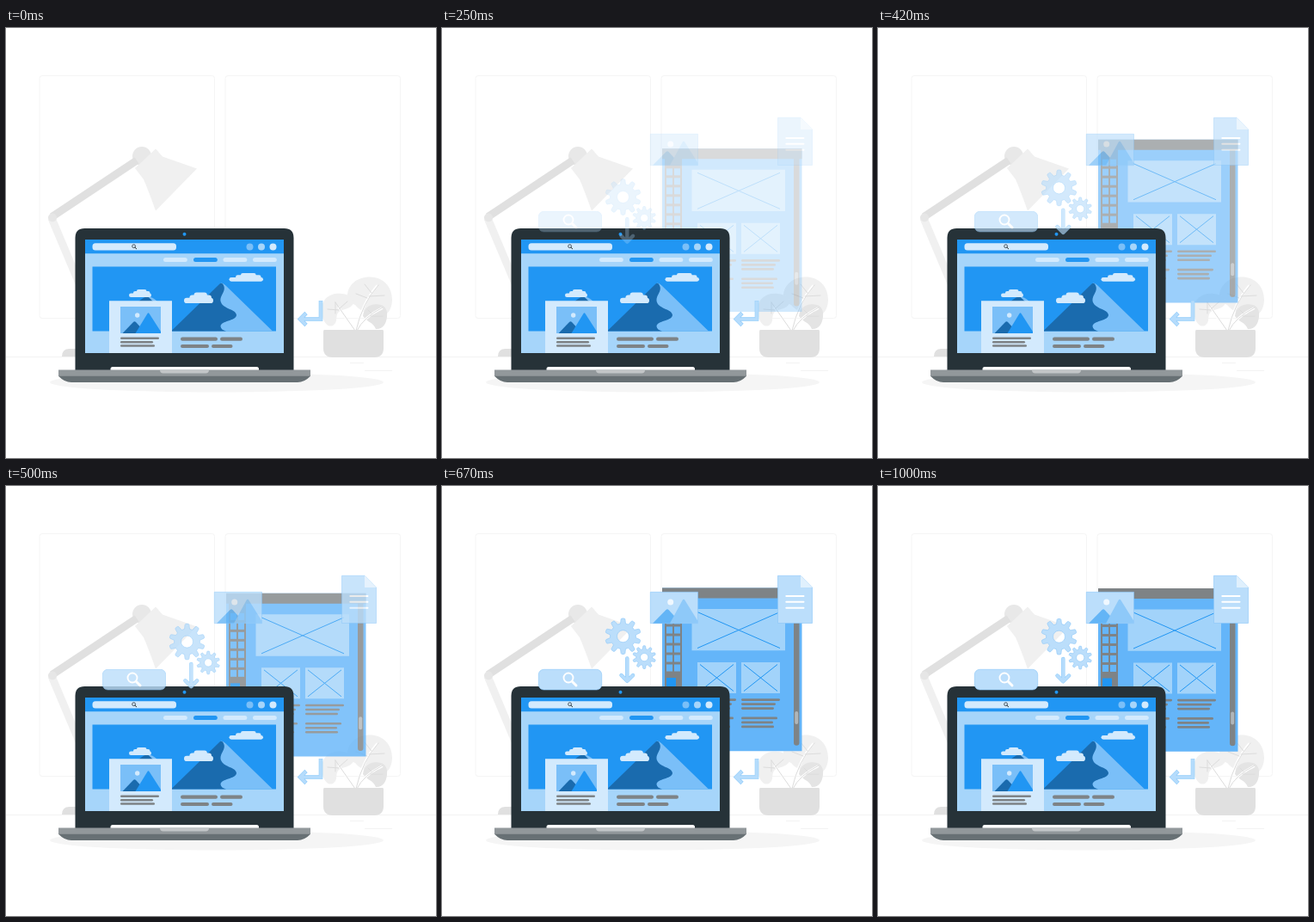
Write an HTML page that moves like this. It is 500 by 500 pixels and loops after 1040 ms.

```html
<!DOCTYPE html>
<html lang="en">
<head>
<meta charset="utf-8">
<title>Web design workspace</title>
<style>
html, body { margin: 0; width: 100%; height: 100%; overflow: hidden; background: #fff; }
svg { display: block; width: 100vw; height: 100vh; }
.line { fill: none; stroke-linecap: round; stroke-linejoin: round; }
.pale { fill: #bbdefb; stroke: #8ac6f8; stroke-width: .6; }
.ice { fill: #d3eafd; }
.gray { fill: #7e8386; }
.blue { fill: #2196f3; }
.navy { fill: #1a6bae; }
.sky { fill: #7abff8; }
</style>
</head>
<body>
<svg viewBox="0 0 500 500">
  <!-- room -->
  <g fill="#fff" stroke="#f5f5f5">
    <rect x="39" y="55.5" width="203.5" height="282" rx="3"/>
    <rect x="255" y="55.5" width="203.5" height="282" rx="3"/>
  </g>
  <path d="M0 382.5H500M400 389.5h16M417 398.5h32" stroke="#f0f0f0" stroke-width=".8"/>
  <ellipse cx="245" cy="412" rx="194" ry="11.5" fill="#f5f5f5"/>

  <!-- lamp -->
  <path d="M65 382q0-9 9-9h14v9z" fill="#e0e0e0"/>
  <path d="M53 221L88 304" stroke="#f0f0f0" stroke-width="9"/>
  <circle cx="158" cy="149" r="11" fill="#e8e8e8"/>
  <path class="line" d="M53.5 219.500L152 154" stroke="#e0e0e0" stroke-width="9" style="stroke-linecap:butt"/>
  <circle cx="54" cy="220.500" r="5" fill="#e6e6e6"/>
  <path d="M150 163L174 140.500L182 149.500L222 163.500L174 212.500Q166 190 160 176Z" fill="#f0f0f0"/>

  <!-- plant -->
  <path d="M397 314C396 299 408 289.500 423 289.500C439 289.500 449 301 449 316C449 327 443 335 435 336C424 333 412 330 406 322C402 320 397 320 397 314Z" fill="#f0f0f0"/>
  <path d="M367 330C366 315 377 307 391 309C400 310 405 315 404 320C401 327 393 326 387 330C382 335 387 342 380 346C373 349 368 340 367 330Z" fill="#f0f0f0"/>
  <path d="M415 335C416 325 424 320 433 321.500C441 322 444 328 443 336C442 345 437 351 430 350C427 342 421 343 415 335Z" fill="#e4e4e4"/>
  <path class="line" d="M405 352L387 325M407 352Q414 320 431 300M408 352Q416 336 437 326" stroke="#fff" stroke-width="2.600"/>
  <path class="line" d="M406 352L383 319M374 327L387 328M383 319V332M388 326L397 318M407 352Q414 320 433 299M425 308L417 298M420 314L407 309M422 312L440 311M408 352Q416 336 438 325M426 333L421 328M424 335L438 335" stroke="#dcdcdc"/>
  <path d="M370 351H438Q439 351 439 353V372Q439 383 428 383H380Q369 383 369 372V353Q369 351 370 351Z" fill="#e0e0e0"/>

  <!-- wireframe page -->
  <g class="fade rise">
    <path d="M256 119H418.500V308.700H256Z" fill="#64b5f9"/>
    <path class="gray" d="M256 119H418.500V131H256ZM259 131H279V260H259ZM409 131H415.500V299a3.250 3.250 0 0 1-6.500 0Z"/>
    <rect x="410.200" y="262.500" width="4" height="15" rx="2" fill="#b0b5b8"/>
    <g id="tiles" fill="#64b5f9"></g>
    <path class="blue" d="M261 223.500h11v10h-11z"/>
    <path d="M290.500 143.500h108.500v48.300h-108.500zM297 205.500h45v36h-45zM348 205.500h45v36h-45z" fill="#a2d3fa"/>
    <path d="M297 147L393 189M393 147L297 189M300 208L339 239M339 208L300 239M351 208L390 239M390 208L351 239" stroke="#2196f3"/>
    <g id="copy" class="gray"></g>
  </g>

  <path class="line" d="M366 317V338.500H342.500M349 331.500L342 338.500L349 345.500" stroke="#8ecbfa" stroke-width="4.600" style="stroke-linecap:butt;stroke-linejoin:miter"/>
  <path class="line" d="M366 317.300V338.500H342.500M348.700 331.800L342 338.500L348.700 345.200" stroke="#b5dcfc" stroke-width="3.600" style="stroke-linecap:butt;stroke-linejoin:miter"/>

  <!-- laptop -->
  <path d="M80.500 398V244Q80.500 233 91.500 233H323.500Q334.500 233 334.500 244V398H294V396.500Q294 394 291.500 394H124Q121.500 394 121.500 396.500V398Z" fill="#263238"/>
  <circle class="blue" cx="207.500" cy="239.700" r="2"/>
  <path d="M92 246H323V378H92Z" fill="#a6d5fa"/>
  <path class="blue" d="M92 246H323V262.300H92ZM100.500 277.500H314V352.500H100.500Z"/>
  <rect class="ice" x="100.500" y="250.300" width="97.500" height="8.200" rx="3.500"/>
  <path class="line" d="M150 255.200l1.700 1.600" stroke="#263238"/>
  <circle cx="148.600" cy="253.700" r="1.900" fill="none" stroke="#263238" stroke-width=".8"/>
  <circle class="sky" cx="283.500" cy="254.500" r="4"/>
  <circle cx="297" cy="254.500" r="4" fill="#a6d5fa"/>
  <circle class="ice" cx="310.500" cy="254.500" r="4"/>
  <g id="tabs"></g>
  <path class="navy" d="M154 318Q161 312 166 312L174 318Z"/>
  <path class="sky" d="M165 312.300Q170 312.500 176 318H171Z"/>
  <path class="sky" d="M250 296.500Q252 296 255 299L310 352.500H245Z"/>
  <path class="navy" d="M192 352.500L248 298Q250 296 252 297.500C258 306 247 311 250 319C253 327 268 327 268 334C267 341 250 340 249.500 347Q250 351 256 352.500Z"/>
  <g id="clouds" class="ice"></g>
  <path class="ice" d="M120 317.300H193V378H120Z"/>
  <path class="sky" d="M133 324H180V355H133Z"/>
  <circle class="ice" cx="152.700" cy="334" r="2.700"/>
  <path class="navy" d="M135.500 355L148 342Q149.500 340.500 151 342L163 355Z"/>
  <path class="blue" d="M150.500 355L164.500 332Q165.500 330.500 166.500 332L180 353V355Z"/>
  <g id="text" class="gray"></g>
  <path d="M61 397.500H354V405H61Z" fill="#92989b"/>
  <path d="M61 404.700H354Q347 412 339 412H76Q68 412 61 404.700Z" fill="#677074"/>
  <path d="M179 397.500H236Q236 401.500 232 401.500H183Q179 401.500 179 397.500Z" fill="#c2c5c7"/>

  <!-- gears and arrow -->
  <g class="fade rise">
    <path id="bigGear" class="pale" fill-rule="evenodd"/>
    <path id="smallGear" class="pale" fill-rule="evenodd"/>
    <path class="line" d="M215.300 201V227M208.500 220.500L215.300 227.300L222.100 220.500" stroke="#8ecbfa" stroke-width="4.400"/>
    <path class="line" d="M215.300 201V227M208.500 220.500L215.300 227.300L222.100 220.500" stroke="#b5dcfc" stroke-width="3.400"/>
  </g>

  <!-- floating cards -->
  <g class="fade">
    <rect class="pale" x="112.300" y="213.300" width="73.400" height="23.700" rx="6"/>
    <path class="line" d="M151.500 227.500L156 232" stroke="#fff" stroke-width="3"/>
    <circle cx="147" cy="223" r="5.500" fill="none" stroke="#fff" stroke-width="1.900"/>
  </g>
  <g class="fade">
    <path class="pale" d="M242.300 123.300H297.500V159.700H242.300Z"/>
    <circle cx="265.700" cy="135" r="3.500" fill="#f0f8ff"/>
    <path d="M245 159.700L260.500 144Q262 142.500 263.500 144L278 159.700Z" fill="#64b5f6"/>
    <path d="M265 159.700L279.500 133Q281 130.500 282.500 133L297.500 157V159.700Z" fill="#8ec9f9"/>
  </g>
  <g class="fade">
    <path class="pale" d="M390.500 104.300H417L430.500 118V159.500H390.500Z"/>
    <path d="M417 104.300L430.500 118H417Z" fill="#e0f0fd"/>
    <path class="line" d="M400.300 128H420.500M400.300 134.800H420.500M400.300 141.700H420.500" stroke="#fff" stroke-width="2"/>
  </g>
</svg>
<script>
const $ = id => document.getElementById(id);
const bar = (x, y, w, h, r = h / 2, cls = '') =>
  `<rect x="${x}" y="${y}" width="${w}" height="${h}" rx="${r}"${cls && ` class="${cls}"`}/>`;

let tiles = '', copy = '';
for (let y = 142; y < 216; y += 11)
  tiles += bar(261, y, 7, 8, 0) + bar(270, y, 7, 8, 0);
$('tiles').innerHTML = tiles;

[45, 40, 38, 42, 37, 38].forEach((w, i) => {
  const y = 247.8 + i * 5 + (i > 2 ? 6.3 : 0);
  copy += bar(297, y, w, 2.6) + bar(348, y, w, 2.6);
});
$('copy').innerHTML = copy;

$('tabs').innerHTML = [183, 218, 252.5, 287]
  .map((x, i) => bar(x, 267, 27.8, 5, 2.5, i === 1 ? 'blue' : 'ice')).join('');

$('text').innerHTML = [
  [133, 359.6, 45, 2.4], [133, 364, 38, 2.4], [133, 368.3, 40, 2.4],
  [203, 359.6, 43, 4.2], [249, 359.6, 26, 4.2],
  [203, 368, 33, 4], [239, 368, 24.5, 4]
].map(b => bar(...b)).join('');

const cloud = (x, y, w, h) =>
  bar(x, y + h * .5, w, h * .5) +
  bar(x + w * .19, y + h * .23, w * .75, h * .5) +
  bar(x + w * .34, y, w * .45, h * .5);
$('clouds').innerHTML =
  cloud(143, 304, 26, 9) + cloud(207, 307.5, 34, 12.5) + cloud(259.5, 285, 39.5, 9.8);

function gear(cx, cy, outer, inner, hole) {
  const teeth = 10, step = 2 * Math.PI / teeth, pts = [];
  for (let i = 0; i < teeth; i++)
    for (const [k, r] of [[-.32, inner], [-.19, outer - .8], [-.12, outer], [.12, outer], [.19, outer - .8], [.32, inner]]) {
      const a = (i + k) * step - Math.PI / 2;
      pts.push((cx + r * Math.cos(a)).toFixed(2) + ' ' + (cy + r * Math.sin(a)).toFixed(2));
    }
  return `M${pts.join('L')}ZM${cx - hole} ${cy}a${hole} ${hole} 0 1 0 ${2 * hole} 0a${hole} ${hole} 0 1 0 ${-2 * hole} 0Z`;
}
$('bigGear').setAttribute('d', gear(210.5, 175.2, 20.8, 15, 7));
$('smallGear').setAttribute('d', gear(235.2, 199.6, 13.4, 9.6, 4.6));

// cubic-bezier(.36, -.01, .5, 1.38)
const bezier = (s, a, b) => 3 * s * (1 - s) * ((1 - s) * a + s * b) + s ** 3;
function ease(x) {
  if (x >= 1) return 1;
  let lo = 0, hi = 1;
  for (let i = 0; i < 24; i++) {
    const mid = (lo + hi) / 2;
    if (bezier(mid, .36, .5) < x) lo = mid; else hi = mid;
  }
  return bezier(lo, -.01, 1.38);
}

const LOOP = 1040, FPS = 24;
const fading = document.querySelectorAll('.fade');
const start = performance.now();

function draw(now) {
  const t = Math.max(0, now - start) % LOOP;
  const n = Math.floor((t + 6) * FPS / 1000);
  const p = n < 2 ? 0 : ease((n + .8) / FPS);
  for (const el of fading) {
    el.setAttribute('opacity', Math.min(1, Math.max(0, p)));
    if (el.classList.contains('rise'))
      el.setAttribute('transform', `translate(0 ${30 * (1 - p)})`);
  }
  requestAnimationFrame(draw);
}
draw(start);
</script>
</body>
</html>
```
